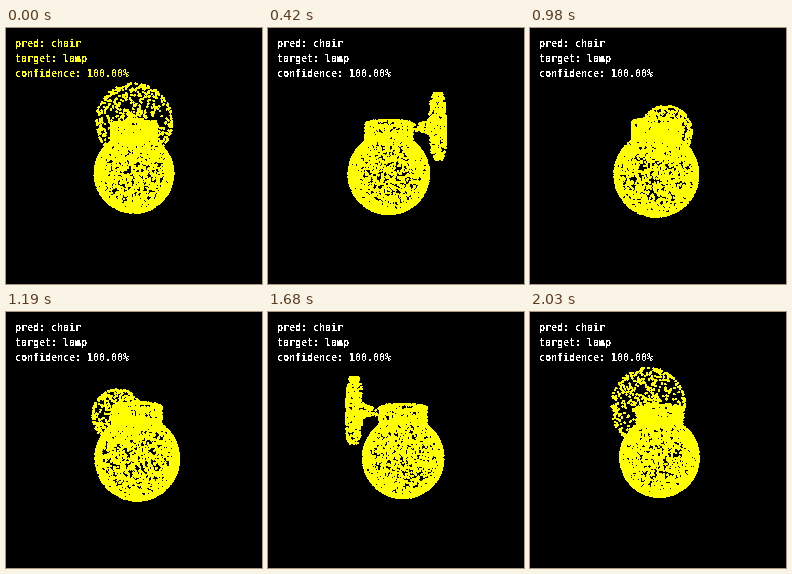
A matplotlib script for the animation above (2.1 s loop, 256 by 256 pixels).

```python
import numpy as np
import matplotlib.pyplot as plt
from matplotlib.animation import FuncAnimation

SIZE, DPI = 256, 100
FRAMES, STEP_MS = 30, 70
CAMERA = 235          # camera distance, in pixels at the rotation axis
BODY_Z = -7.4         # depth of the globe and neck axis
DOT_RADIUS = 1.28
YELLOW = "#ffff00"
LINES = ["pred: chair", "target: lamp", "confidence: 100.00%"]

rng = np.random.default_rng(7)


def globe(n, radius, y, z):
    v = rng.normal(size=(n, 3))
    v *= radius / np.linalg.norm(v, axis=1, keepdims=True)
    return v + (0, y, z)


def angles(n):
    return rng.uniform(0, 2 * np.pi, n)


def neck_wall(n, radius, low, high):
    a = angles(n)
    return np.c_[radius * np.cos(a), rng.uniform(low, high, n),
                 BODY_Z + radius * np.sin(a)]


def neck_top(n, inner, outer, y):
    a = angles(n)
    r = np.sqrt(rng.uniform(inner**2, outer**2, n))
    return np.c_[r * np.cos(a), np.full(n, y), BODY_Z + r * np.sin(a)]


def ring(r, z, y):
    """Points around the horizontal axis through height y."""
    a = angles(len(r))
    return np.c_[r * np.cos(a), y + r * np.sin(a), z]


def plate(n_face, n_rim, radius, y, back, front):
    r = radius * np.sqrt(rng.random(n_face))
    z = rng.choice([back, front], n_face)
    rim = ring(np.full(n_rim, radius), rng.uniform(back, front, n_rim), y)
    return np.vstack([ring(r, z, y), rim])


def arm(n, y, start, end):
    t = np.sqrt(rng.random(n))
    return ring(3.5 + 9 * t**3, start + (end - start) * t, y)


cloud = np.vstack([
    globe(2800, 40, -17.5, BODY_Z),
    neck_wall(450, 23.5, 14, 33),
    neck_top(190, 14, 23.5, 33),
    plate(400, 140, 30.8, 27.6, 38.8, 46.2),
    arm(130, 27.6, 16, 39),
])


def project(angle):
    x, y, z = cloud.T
    c, s = np.cos(angle), np.sin(angle)
    scale = CAMERA / (CAMERA - (z * c - x * s))
    return 128 + (x * c + z * s) * scale, 128 - y * scale


def splat(x, y):
    """Fill every pixel whose centre lies within a dot."""
    img = np.zeros((SIZE, SIZE, 3))
    col, row = np.floor(x).astype(int), np.floor(y).astype(int)
    for dx in (-1, 0, 1):
        for dy in (-1, 0, 1):
            px, py = col + dx, row + dy
            hit = np.hypot(px + 0.5 - x, py + 0.5 - y) < DOT_RADIUS
            img[py[hit], px[hit], :2] = 1
    return img


fig = plt.figure(figsize=(SIZE / DPI, SIZE / DPI), dpi=DPI, facecolor="black")
ax = fig.add_axes([0, 0, 1, 1])
view = ax.imshow(np.zeros((SIZE, SIZE, 3)), extent=(0, SIZE, SIZE, 0),
                 interpolation="nearest")
ax.axis("off")

labels = [ax.text(9, 19 + 15 * i, line, family="DejaVu Sans Mono",
                  weight="bold", size=10 * 72 / DPI, va="baseline",
                  antialiased=False)
          for i, line in enumerate(LINES)]


def draw(i):
    view.set_data(splat(*project(2 * np.pi * i / FRAMES)))
    for label in labels:
        label.set_color(YELLOW if i == 0 else "white")
    return [view, *labels]


anim = FuncAnimation(fig, draw, frames=FRAMES, interval=STEP_MS,
                     repeat=True, repeat_delay=0)
plt.show()
```
